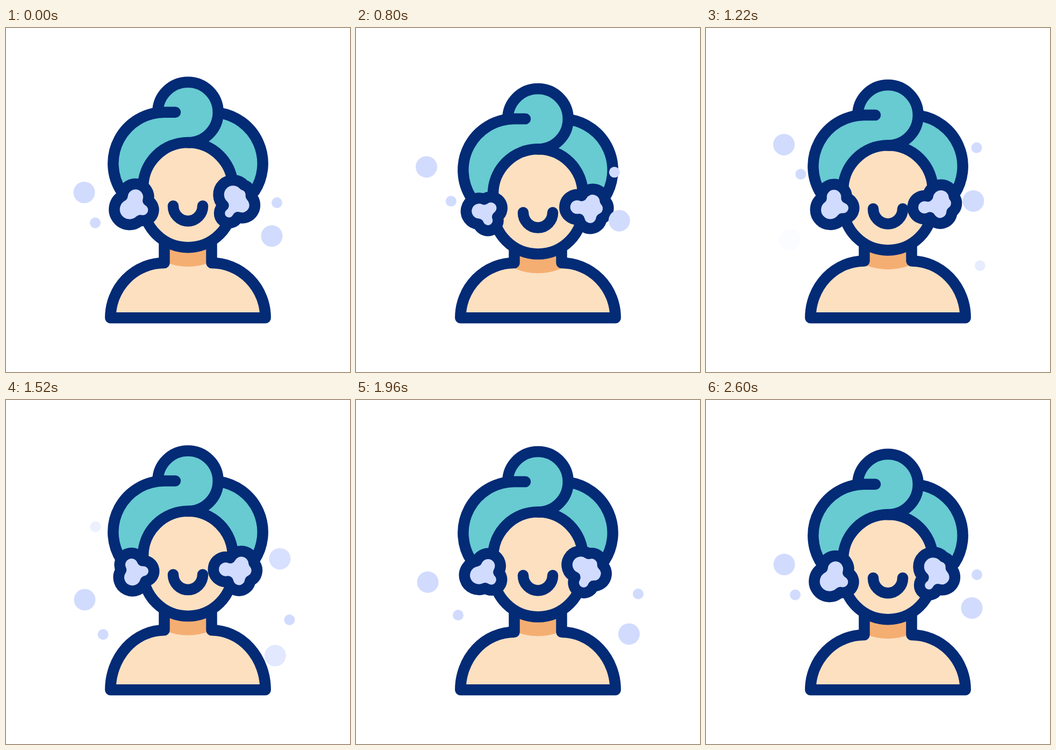
Animation, 640 px wide and 640 px high, one loop 3 s. Source, as an HTML page:

```html
<!DOCTYPE html>
<html lang="en">
<head>
<meta charset="utf-8">
<title>Face wash</title>
<style>
  html, body { margin: 0; width: 100%; height: 100%; overflow: hidden; background: #fff; }
  svg { display: block; width: 100%; height: 100%; }
  .line { fill: none; stroke: #032b76; stroke-width: 20.5; stroke-linecap: round; stroke-linejoin: round; }
  .skin { fill: #fce0c0; }
  .teal { fill: #67cbd1; }
  .foam { fill: #d1dbfe; }
</style>
</head>
<body>
<svg viewBox="0 0 640 640">
  <defs><clipPath id="clip"><path id="clipBody"/></clipPath></defs>

  <path id="skin" class="skin"/>
  <g clip-path="url(#clip)"><circle id="shade" cx="338.5" cy="335" r="109" fill="#f5ae72"/></g>
  <path id="body" class="line"/>

  <g id="head">
    <path class="teal" d="M215 304A95.3 95.3 0 0 1 294 156.7H383A95.3 95.3 0 0 1 462 304Z"/>
    <circle class="teal" cx="338.5" cy="157" r="56"/>
    <path class="line" d="M214.8 304A95.3 95.3 0 0 1 294 156.7H315"/>
    <path class="line" d="M398 158A95.3 95.3 0 0 1 462.2 304"/>
    <rect class="skin" x="255" y="213" width="167" height="195.2" rx="83.5"/>
    <rect class="line" x="255" y="213" width="167" height="195.2" rx="83.5"/>
    <path class="line" d="M282.3 157A56.2 56.2 0 1 1 338.5 213.2"/>
    <path class="line" d="M311 331A27.5 28.2 0 0 0 366 331"/>
  </g>

  <g id="foams"></g>
  <g id="bubbles"></g>
</svg>
<script>
const LOOP = 3000;
const TAU = Math.PI * 2;
const $ = id => document.getElementById(id);

function add(parent, tag, attrs) {
  const el = document.createElementNS('http://www.w3.org/2000/svg', tag);
  for (const k in attrs) el.setAttribute(k, attrs[k]);
  return parent.appendChild(el);
}

const clamp = u => Math.max(0, Math.min(1, u));
const ease = u => u * u * (3 - 2 * u);
// Elapsed time with a gentle start
const soft = d => d > 0 ? d * d / (d + 100) : 0;

// Eased moves that rest at each [time, value] stop
function stops(keys, t) {
  let v = keys[0][1];
  for (let i = 1; i < keys.length; i++) {
    const [t0, v0] = keys[i - 1], [t1, v1] = keys[i];
    if (t >= t0) v = v0 + (v1 - v0) * ease(clamp((t - t0) / (t1 - t0)));
  }
  return v;
}

const headY = t => stops([[200, 0], [900, 13], [1700, -9], [2240, 0]], t);
const bodyY = t => stops([[900, 0], [1700, -10], [2240, 0]], t);

// Lobes sit around the foam's centre; twist turns them and changes reach and size
const foams = [
  {
    x: 242, y: 331, drift: 0,
    lift: t => stops([[200, 0], [820, 14], [1560, -13], [2440, 0]], t),
    twist: t => stops([[340, 0], [840, 1], [1440, -0.75], [1980, 0.38], [2600, 0]], t),
    lobes: [
      { angle: 152, reach: 13.6, size: 18.5, turn: 47, extend: 0, swell: -4.5 },
      { angle: -94, reach: 16.5, size: 14.5, turn: 47, extend: -3, swell: -4 },
      { angle: 31, reach: 14.6, size: 10, turn: 45, extend: -1, swell: -1 }
    ]
  },
  {
    x: 429, y: 324, drift: 0.4,
    lift: headY,
    twist: t => stops([[200, 0], [1100, 1], [2400, 0]], t),
    lobes: [
      { angle: -115, reach: 15.4, size: 17, turn: -77, extend: 10, swell: -5.5 },
      { angle: -60, reach: 16, size: 9, turn: -5, extend: -2, swell: 6 },
      { angle: 29, reach: 11.4, size: 14, turn: -42, extend: 4, swell: -4 },
      { angle: 124, reach: 25, size: 8, turn: -55, extend: -12, swell: 4 }
    ]
  }
];
for (const f of foams) {
  f.fill = add($('foams'), 'path', { class: 'foam' });
  f.edge = add($('foams'), 'path', { class: 'line' });
}

// Outer arcs of a union of circles
function outline(cs) {
  let d = '';
  cs.forEach((c, i) => {
    const others = cs.filter((_, j) => j !== i), cuts = [];
    for (const o of others) {
      const dx = o.x - c.x, dy = o.y - c.y, dist = Math.hypot(dx, dy);
      if (dist >= c.r + o.r || dist <= Math.abs(c.r - o.r)) continue;
      const mid = Math.atan2(dy, dx);
      const w = Math.acos((dist * dist + c.r * c.r - o.r * o.r) / (2 * dist * c.r));
      cuts.push((mid - w + TAU) % TAU, (mid + w + TAU) % TAU);
    }
    cuts.sort((a, b) => a - b);
    const at = a => [c.x + c.r * Math.cos(a), c.y + c.r * Math.sin(a)];
    cuts.forEach((a, k) => {
      const b = k + 1 < cuts.length ? cuts[k + 1] : cuts[0] + TAU;
      const [mx, my] = at((a + b) / 2);
      if (others.some(o => Math.hypot(mx - o.x, my - o.y) < o.r)) return;
      d += `M${at(a)}A${c.r} ${c.r} 0 ${b - a > Math.PI ? 1 : 0} 1 ${at(b)}`;
    });
  });
  return d;
}

const disc = c => `M${c.x - c.r} ${c.y}a${c.r} ${c.r} 0 1 0 ${2 * c.r} 0a${c.r} ${c.r} 0 1 0 ${-2 * c.r} 0Z`;

function drawFoam(f, t) {
  const lift = f.lift(t), k = f.twist(t), m = Math.abs(k);
  const cs = f.lobes.map(l => {
    const a = (l.angle + l.turn * k) * TAU / 360, reach = l.reach + l.extend * m;
    return {
      x: f.x + f.drift * Math.abs(lift) + reach * Math.cos(a),
      y: f.y + lift + reach * Math.sin(a),
      r: l.size + l.swell * m + 10
    };
  });
  f.fill.setAttribute('d', cs.map(disc).join(''));
  f.edge.setAttribute('d', outline(cs));
}

// Each bubble rises away from its resting place while its successor rises into it
const bubbles = [
  {
    r: 20, x: 145.5, y: 306,
    leave: { at: 240, speed: 0.1, swing: -14.5, half: 90, fade: 1240 },
    arrive: { at: 2480, speed: 0.0755, swing: -12, half: 64, fade: 1200 }
  },
  {
    r: 10, x: 166, y: 362.5,
    leave: { at: 390, speed: 0.122, swing: 13, half: 128, fade: 1400 },
    arrive: { at: 2500, speed: 0.083, swing: 25, half: 92, fade: 1280 }
  },
  {
    r: 20, x: 494.5, y: 387,
    leave: { at: 400, speed: 0.089, swing: -9, half: 80, lean: 0.12, fade: 1490 },
    arrive: { at: 2570, speed: 0.0925, swing: 13.5, half: 105, fade: 1390 }
  },
  {
    r: 10, x: 504, y: 325,
    leave: { at: 200, speed: 0.11, swing: -23.5, half: 103, fade: 1230 },
    arrive: { at: 2360, speed: 0.112, swing: 27, half: 126, fade: 1110 }
  }
];
for (const b of bubbles) {
  for (const leg of [b.leave, b.arrive]) leg.el = add($('bubbles'), 'circle', { class: 'foam', r: b.r });
}

function drawLeg(b, leg, dir, t) {
  const q = leg.speed * soft(dir * (t - leg.at));
  const shown = clamp((t - leg.fade) / 210);
  leg.el.setAttribute('cx', b.x + leg.swing * Math.sin(Math.PI * q / leg.half) + (leg.lean || 0) * q);
  leg.el.setAttribute('cy', b.y - dir * q);
  leg.el.setAttribute('opacity', dir > 0 ? 1 - shown : shown);
}

function draw(t) {
  const hy = headY(t), top = 437 + bodyY(t), base = 539.3, ry = base - top;
  const d = `M294.5 372V${top}A100.2 ${ry} 0 0 0 194.3 ${base}H482.7A100.2 ${ry} 0 0 0 382.5 ${top}V372`;
  for (const id of ['skin', 'clipBody', 'body']) $(id).setAttribute('d', d);
  $('head').setAttribute('transform', `translate(0 ${hy})`);
  $('shade').setAttribute('cy', 335 + hy);
  for (const f of foams) drawFoam(f, t);
  for (const b of bubbles) {
    drawLeg(b, b.leave, 1, t);
    drawLeg(b, b.arrive, -1, t);
  }
}

function tick() {
  draw(performance.now() % LOOP);
  requestAnimationFrame(tick);
}
tick();
</script>
</body>
</html>
```
